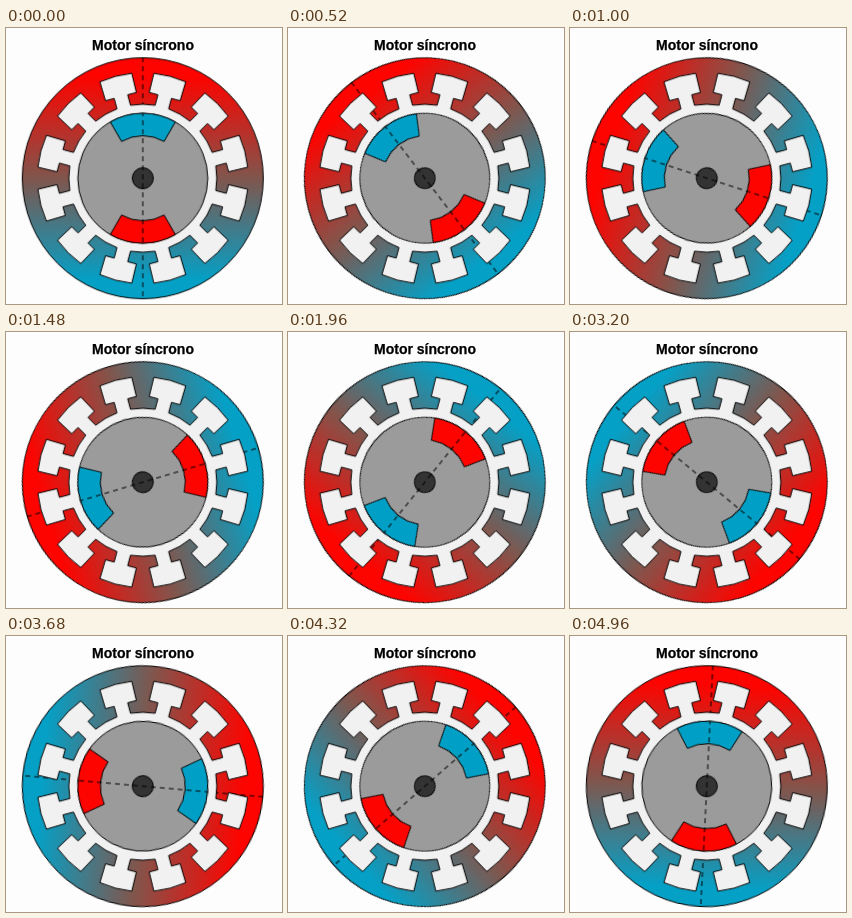
An HTML page for the animation above (5000 ms loop, 276 by 276 pixels).

```html
<!DOCTYPE html>
<html lang="es">
<head>
<meta charset="utf-8">
<title>Motor síncrono</title>
<style>
  html, body { margin: 0; width: 100%; height: 100%; overflow: hidden; background: #fdfdfd; }
  svg { display: block; width: 276px; height: 276px; }
  text { font: bold 14px "Liberation Sans", Arial, sans-serif; text-anchor: middle; fill: #000; stroke: #000; stroke-width: .25; }
  .line { stroke: #000; stroke-width: 1; }
  .axis { stroke-dasharray: 5 4; }
  .spin { animation: spin 5s steps(125) infinite; transform-origin: 0 0; }
  @keyframes spin { to { transform: rotate(-360deg); } }
</style>
</head>
<body>
<svg viewBox="0 0 276 276">
  <defs>
    <linearGradient id="field" x1="0" y1="0" x2="0" y2="1">
      <stop offset=".08" stop-color="#fd0400"/>
      <stop offset=".5" stop-color="#80564d"/>
      <stop offset=".92" stop-color="#05a0c6"/>
    </linearGradient>
  </defs>
  <text x="137" y="22">Motor síncrono</text>
  <g transform="translate(136.8 150.2)">
    <g class="spin">
      <circle class="line" r="120.5" fill="url(#field)"/>
      <path class="line axis" d="M0-121V121"/>
    </g>
    <path id="slots" class="line" fill="#f1f1f1"/>
    <g class="spin">
      <circle class="line" r="65" fill="#9b9b9b"/>
      <path class="pole line" fill="#00a0c6"/>
      <path class="pole line" fill="#fd0400" transform="rotate(180)"/>
      <circle class="line" r="10.5" fill="#333"/>
      <path class="line axis" d="M0-65V65" stroke-dashoffset="56"/>
    </g>
  </g>
</svg>
<script>
  const RAD = Math.PI / 180;
  const BORE = 74, BAR_IN = 84.5, BAR_OUT = 105.5;
  const NECK = 7, HALF_IN = 16, HALF_OUT = 16.5;

  // Point at sideways offset x and radial height h, turned clockwise from the top.
  const at = (x, h, deg) => {
    const c = Math.cos(deg * RAD), s = Math.sin(deg * RAD);
    return `${(x * c + h * s).toFixed(2)} ${(x * s - h * c).toFixed(2)}`;
  };
  const arc = (r, sweep, end) => `A${r} ${r} 0 0 ${sweep} ${end}`;
  const rise = (r, x) => Math.sqrt(r * r - x * x);

  function slotPath() {
    const neck = rise(BORE, NECK), top = rise(BAR_OUT, HALF_OUT);
    let d = '';
    for (let a = 15; a < 360; a += 30) {
      const start = at(-NECK, neck, a);
      d += d ? arc(BORE, 1, start) : 'M' + start;
      d += 'L' + [at(-NECK, BAR_IN, a), at(-HALF_IN, BAR_IN, a), at(-HALF_OUT, top, a)].join('L');
      d += arc(BAR_OUT, 1, at(HALF_OUT, top, a));
      d += 'L' + [at(HALF_IN, BAR_IN, a), at(NECK, BAR_IN, a), at(NECK, neck, a)].join('L');
    }
    return d + arc(BORE, 1, at(-NECK, neck, 15)) + 'Z';
  }

  function polePath(outer, inner, half) {
    return 'M' + at(0, outer, -half) + arc(outer, 1, at(0, outer, half)) +
      'L' + at(0, inner, half) + arc(inner, 0, at(0, inner, -half)) + 'Z';
  }

  document.getElementById('slots').setAttribute('d', slotPath());
  document.querySelectorAll('.pole').forEach(p => p.setAttribute('d', polePath(65, 42.5, 30)));
</script>
</body>
</html>
```
